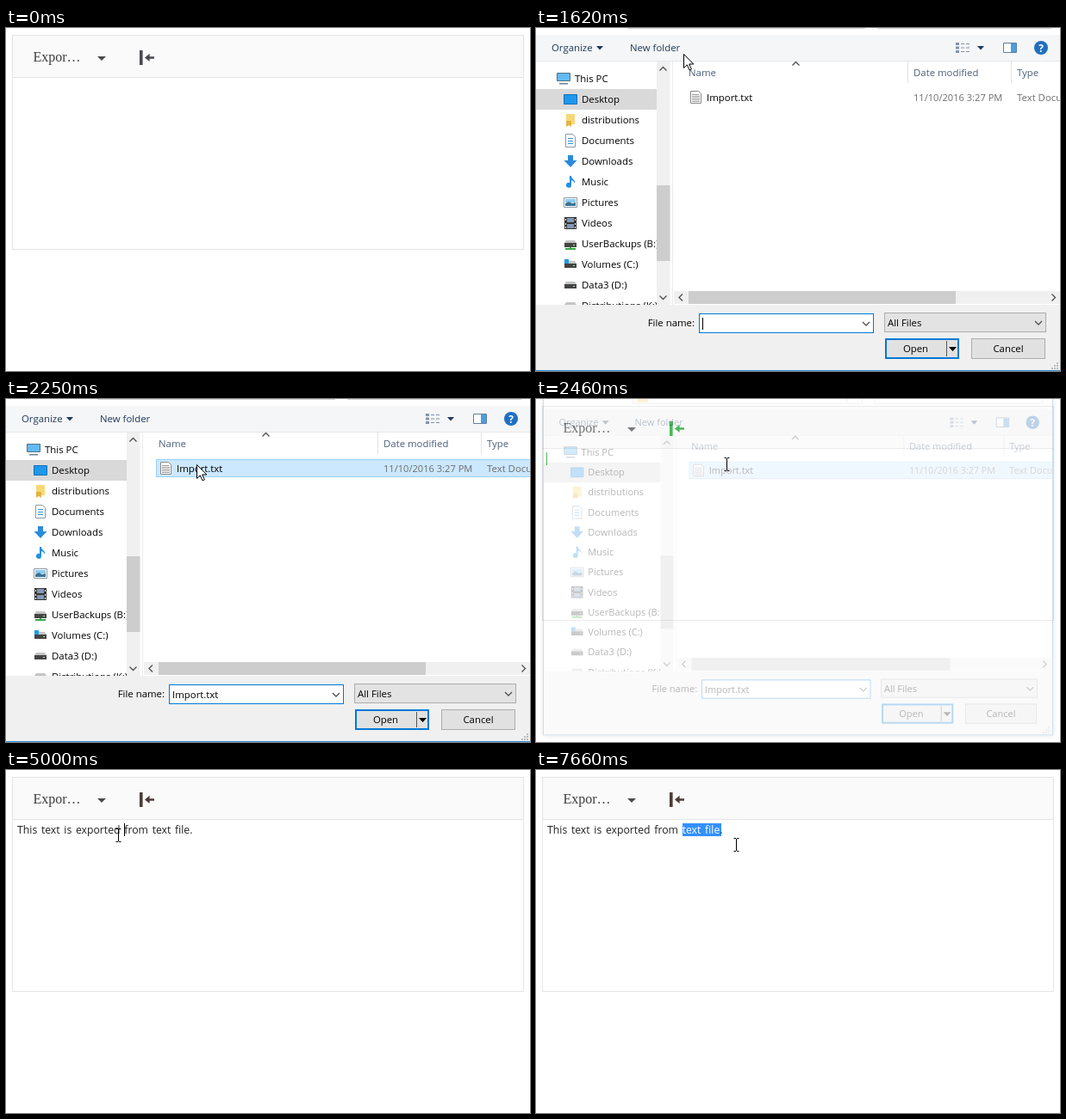
These frames come from a looping animation (608 px wide and 399 px high, 8000 ms). An HTML page:

```html
<!DOCTYPE html>
<html lang="en">
<head>
<meta charset="utf-8">
<title>Import text</title>
<style>
html, body { margin: 0; width: 100%; height: 100%; overflow: hidden; background: #fff; }
svg { display: block; width: 608px; height: 399px; }
text { white-space: pre; }
.ui { font: 11.4px "Open Sans", "Noto Sans", sans-serif; }
#line { font: 12.25px "Open Sans", "Noto Sans", sans-serif; word-spacing: 1.5px; fill: #222; }
#picked { fill: #fff; }
.menu { font: 16px "Liberation Serif", "Times New Roman", serif; fill: #3c3c3c; }
.head { fill: #4c607a; }
.soft { fill: #6d6d6d; }
.chev { fill: none; stroke: #505050; stroke-width: 1.3; }
#dialog { filter: drop-shadow(0 1px 4px rgba(0, 0, 0, .3)); }
</style>
</head>
<body>
<svg viewBox="0 0 608 399">
  <defs>
    <clipPath id="sideClip"><rect x="0" y="38" width="140" height="284"/></clipPath>
    <clipPath id="paneClip"><rect x="159" y="38" width="450" height="284"/></clipPath>
  </defs>

  <!-- editor -->
  <rect width="608" height="399" fill="#fff"/>
  <rect x="8" y="9" width="592" height="48" fill="#fafafa"/>
  <path d="M7.5 8.5H600.5V257.5H7.5zM8 57.5H600" fill="none" stroke="#e4e4e4"/>
  <text class="menu" x="31.5" y="39">Expor…</text>
  <path d="M106 33h10l-5 5z" fill="#4a4a4f"/>
  <path id="icon" d="M155 26h3.6v17H155zM161 34.4l5.6-4.6v3.4h5.4v2.5h-5.4V39z"/>
  <rect id="mark" y="62" height="15" fill="#3390ff"/>
  <text id="line" x="13" y="74"><tspan id="before"></tspan><tspan id="picked"></tspan><tspan id="after"></tspan></text>
  <rect id="caret" y="62" width="1" height="15"/>

  <!-- file dialog -->
  <g id="dialog" class="ui">
    <rect x="-.5" y="-60" width="610.5" height="458.5" fill="#fff" stroke="#2a8ad4"/>
    <path d="M106.5-24H381.5V.5H106.5zM363.5-24V.5M396.5-24H597.5V.5H396.5z" fill="#fff" stroke="#d0d0d0"/>
    <rect x="112" y="-9" width="13" height="8" fill="#f7d16b"/>
    <rect y="8" width="609.5" height="30" fill="#f5f6f7"/>
    <path d="M0 38.5H609" stroke="#e6e8ea"/>
    <g id="tools" fill="#1e395b">
      <text x="18" y="27">Organize</text>
      <path d="M70 21h8l-4 4.5z"/>
      <text x="109" y="27">New folder</text>
      <path d="M487 17h4v3h-4zM487 21.500h4v3h-4zM487 26h4v3h-4z" fill="#8193a8"/>
      <path d="M493 18.500h4m2 0h4M493 23h4m2 0h4M493 27.500h4m2 0h4" stroke="#8193a8"/>
      <path d="M512 21h8l-4 4.500z"/>
    </g>
    <path d="M542.5 17.500h15v11h-15z" fill="#fff" stroke="#6080a0"/>
    <path d="M551 18h6v10h-6z" fill="#4b9fe0"/>
    <circle cx="586" cy="23" r="8" fill="#1f6fc0"/>
    <text x="586" y="27.500" text-anchor="middle" fill="#fff" font-weight="700" font-size="12">?</text>

    <g clip-path="url(#sideClip)">
      <rect y="71" width="140" height="24" fill="#d9d9d9"/>
      <g id="places"></g>
    </g>
    <rect x="140" y="39" width="15.500" height="283" fill="#f0f0f0"/>
    <rect x="140" y="183" width="15.500" height="88" fill="#cdcdcd"/>
    <path class="chev" d="M143.500 49.500l4-4 4 4M143.500 311.500l4 4 4-4"/>
    <path d="M158.500 39V322" stroke="#ececec"/>

    <g clip-path="url(#paneClip)">
      <rect id="row" x="174.500" y="70.500" width="440" height="20"/>
      <path d="M431.500 39V64M551.500 39V64" stroke="#e2e2e2"/>
      <path class="chev" d="M297.500 43.500l4-4 4 4" stroke-width="1"/>
      <text class="head" x="177" y="56">Name</text>
      <text class="head" x="438" y="56">Date modified</text>
      <text class="head" x="558" y="56">Type</text>
      <path d="M179.500 73.500h9l3 3v11h-12z" fill="#fff" stroke="#8a8a8a"/>
      <path d="M181 77.500h8m-8 2h9m-9 2h9m-9 2h9m-9 2h9" stroke="#9a9a9a"/>
      <text x="198" y="85">Import.txt</text>
      <text class="soft" x="438" y="85" font-size="11.1">11/10/2016 3:27 PM</text>
      <text class="soft" x="558" y="85">Text Document</text>
      <rect x="160" y="306" width="449" height="15" fill="#f0f0f0"/>
      <rect x="177" y="306" width="310" height="15" fill="#cdcdcd"/>
      <path class="chev" d="M170 309.500l-4 4 4 4M598.500 309.500l4 4-4 4"/>
    </g>

    <rect y="322" width="609.500" height="76" fill="#f0f0f0"/>
    <text x="184" y="347" text-anchor="end">File name:</text>
    <rect x="189.500" y="332.500" width="202" height="22" fill="#fff" stroke="#0078d7"/>
    <path class="chev" d="M379 342l4 4 4-4"/>
    <rect id="blink" x="193" y="337" width="1" height="14"/>
    <text id="field" x="193" y="348"></text>
    <rect x="404.500" y="331.500" width="187" height="22" fill="#e3e3e3" stroke="#adadad"/>
    <text x="408" y="347">All Files</text>
    <path class="chev" d="M579 341l4 4 4-4"/>
    <rect x="406" y="362" width="84" height="22" fill="#e1e1e1" stroke="#0078d7" stroke-width="2"/>
    <text x="440.500" y="377" text-anchor="middle">Open</text>
    <path d="M476.500 364V382" stroke="#555"/>
    <path d="M479 371h9l-4.500 5z"/>
    <rect x="505.500" y="361.500" width="85" height="23" fill="#e1e1e1" stroke="#adadad"/>
    <text x="548" y="377" text-anchor="middle">Cancel</text>
    <path d="M604 389h2v2h-2zM601 392h2v2h-2zM604 392h2v2h-2zM598 395h2v2h-2zM601 395h2v2h-2zM604 395h2v2h-2z" fill="#bcbcbc"/>
  </g>

  <!-- pointers -->
  <path id="arrow" d="M.5.500v16l3.800-3.600 2.700 6 2.400-1-2.700-5.900h5.100z" fill="#fff" stroke="#000"/>
  <path id="beam" d="M-2.500-7.500h2.500m1 0h2.500M.5-7V7M-2.500 7.500h2.500m1 0h2.500" fill="none" stroke="#000"/>
</svg>
<script>
const LOOP = 8000;
const $ = id => document.getElementById(id);
const shape = (d, fill, more = '') => `<path d="${d}" fill="${fill}" ${more}/>`;

// Sidebar icons, drawn around their own centre
const drive = shape('M-5-4h10l2 3h-14z', '#c4c4c4') + shape('M-7-1h14v5h-14z', '#444') +
  shape('M3 1h2v1h-2z', '#9fe09f');
const share = drive + shape('M-6 5h12v2h-12zM-1 4h2v3h-2z', '#36a64a');
const icons = {
  pc: shape('M-7.500-6.500h15v9h-15z', '#62baf0', 'stroke="#4f7288"') + shape('M-5 5h10v1.500h-10z', '#6d8291'),
  desk: shape('M-7.500-5.500h15v11h-15z', '#1f97ea', 'stroke="#1173bd"'),
  folder: shape('M-5-7h10v12h-10z', '#f8d775') + shape('M-5 1h6v7l-3-2-3 2z', '#e3b33f'),
  doc: shape('M-5.500-7.500h8l3 3v12h-11z', '#fff', 'stroke="#8b9aa5"') +
    shape('M-3-3h6v1h-6zM-3 0h6v1h-6zM-3 3h6v1h-6z', '#3c92d2'),
  down: shape('M-3-7h6v6h4.500l-7.500 8-7.500-8h4.500z', '#2b8bdb'),
  note: shape('M-1-7h2c0 4 5 4 4 9-1-3-3-4-4-4v6a3 3 0 1 1-2-3z', '#1e90e0'),
  photo: shape('M-7.500-5.500h15v11h-15z', '#fff', 'stroke="#8b9aa5"') +
    shape('M-6-4h12v4h-12z', '#8dcbf2') + shape('M-6 4v-3l4-2 4 2 4-1v4z', '#3a7396'),
  film: shape('M-7-7h14v14h-14z', '#333') + shape('M-4-6h8v5h-8zM-4 1h8v5h-8z', '#8199b5') +
    shape('M-6-5h1v2h-1zM-6 0h1v2h-1zM-6 4h1v2h-1zM5-5h1v2h-1zM5 0h1v2h-1zM5 4h1v2h-1z', '#fff'),
  main: drive + shape('M-7-6h5v5h-5z', '#1e9be8'),
  drive, share
};
const places = [
  ['pc', 'This PC'], ['desk', 'Desktop'], ['folder', 'distributions'], ['doc', 'Documents'],
  ['down', 'Downloads'], ['note', 'Music'], ['photo', 'Pictures'], ['film', 'Videos'],
  ['share', 'UserBackups (B:)'], ['main', 'Volumes (C:)'], ['drive', 'Data3 (D:)'],
  ['share', 'Distributions (K:)']
];
$('places').innerHTML = places.map(([icon, name], i) =>
  `<g transform="translate(${i ? 40 : 32} ${59 + 24 * i})">${icons[icon]}<text x="13" y="4">${name}</text></g>`
).join('');

const imported = ['This text is imported from text file.', '', ''];
const exported = ['This text is exported from text file.', '', ''];
const drag = (picked, after) => ['This text is exported from ', picked, after];

// Each step changes only what it names; everything else carries on.
const steps = [
  [0, { pointer: '', at: [0, 0], icon: '#4a4a4f', line: ['', '', ''], mark: [0, 0], caret: 0,
        dialog: 0, place: [0, 0, 1], tools: 0, blink: 0, field: '', row: 'none' }],
  [290, { pointer: 'arrow', at: [441, 383] }],
  [400, { at: [320, 225] }],
  [510, { at: [226, 98] }],
  [620, { at: [181, 42] }],
  [720, { at: [171, 30], icon: '#1c7a35' }],
  [1380, { dialog: .45, place: [7.8, 4.4, .971], blink: 1 }],
  [1500, { dialog: .85, place: [2, 1.200, .993], tools: 1 }],
  [1620, { dialog: 1, place: [0, 0, 1] }],
  [1820, { at: [196, 56], blink: 0 }],
  [1950, { at: [213, 71] }],
  [2030, { at: [218, 74], row: '#e5f3ff' }],
  [2130, { at: [221, 76] }],
  [2240, { row: '#cce8ff', field: 'Import.txt' }],
  [2350, { dialog: .75, place: [3, 1.700, .989], icon: '#08a018' }],
  [2460, { dialog: .28, place: [9, 5, .968], pointer: 'beam', caret: 12 }],
  [2600, { dialog: 0, icon: '#4a3c38' }],
  [3020, { at: [238, 78], line: imported }],
  [3130, { at: [240, 78] }],
  [3570, { at: [147, 77] }],
  [3680, { at: [138, 76] }],
  [3800, { at: [132, 76] }],
  [3910, { at: [130, 76], caret: 0 }],
  [4130, { line: ['This text is ', 'imported', ' from text file.'], mark: [82, 139] }],
  [5000, { line: exported, mark: [0, 0], caret: 137 }],
  [5550, { at: [141, 76] }],
  [5660, { at: [156, 76] }],
  [5780, { at: [169, 75] }],
  [5890, { at: [176, 75] }],
  [6110, { at: [172, 72] }],
  [6230, { at: [171, 72], caret: 0 }],
  [6450, { at: [170, 72], caret: 137 }],
  [6550, { caret: 0 }],
  [6990, { at: [184, 72], line: drag('te', 'xt file.'), mark: [170, 181] }],
  [7120, { at: [203, 72], line: drag('text f', 'ile.'), mark: [170, 202] }],
  [7240, { at: [217, 72], line: drag('text file', '.'), mark: [170, 215] }],
  [7660, { at: [232, 87] }]
];

const show = (id, on) => $(id).style.display = on ? '' : 'none';
const set = (id, name, value) => $(id).setAttribute(name, value);

function draw(t) {
  const s = Object.assign({}, ...steps.filter(([start]) => start <= t).map(step => step[1]));
  set('icon', 'fill', s.icon);
  ['before', 'picked', 'after'].forEach((id, i) => $(id).textContent = s.line[i]);
  set('mark', 'x', s.mark[0]);
  set('mark', 'width', s.mark[1] - s.mark[0]);
  show('caret', s.caret);
  set('caret', 'x', s.caret);
  set('caret', 'fill', s.dialog ? s.icon : '#000');

  const [x, y, scale] = s.place;
  show('dialog', s.dialog);
  set('dialog', 'opacity', s.dialog);
  set('dialog', 'transform', `translate(${x} ${y}) scale(${scale})`);
  show('tools', s.tools);
  show('blink', s.blink);
  $('field').textContent = s.field;
  set('row', 'fill', s.row);
  set('row', 'stroke', s.field ? '#99d1ff' : 'none');

  for (const id of ['arrow', 'beam']) {
    show(id, s.pointer === id);
    set(id, 'transform', `translate(${s.at})`);
  }
}

function tick() {
  draw(performance.now() % LOOP);
  requestAnimationFrame(tick);
}
tick();
</script>
</body>
</html>
```
